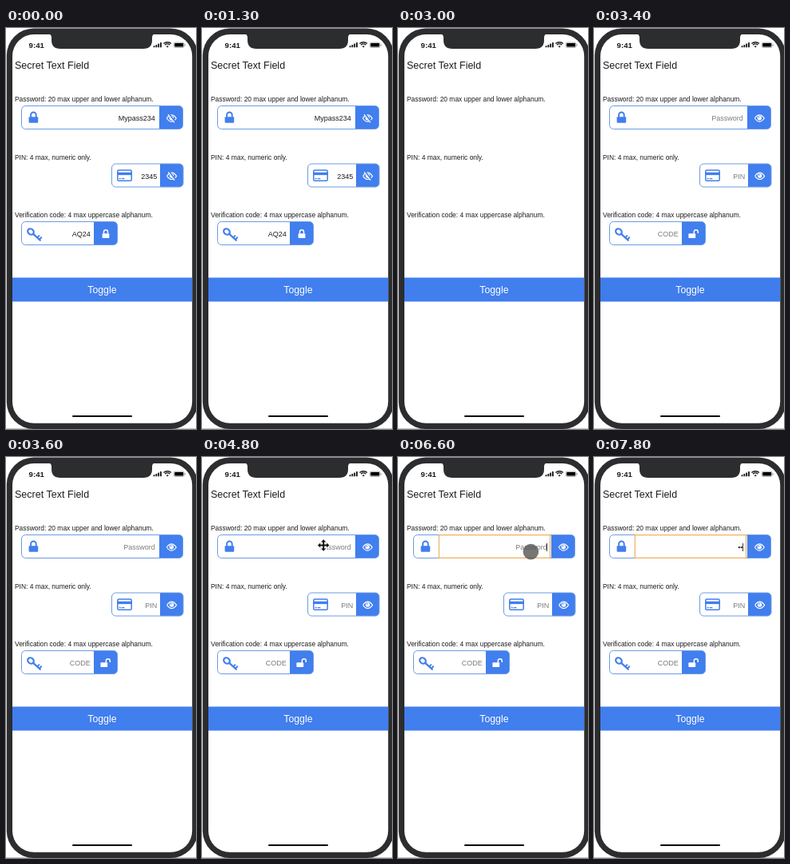
An HTML page with a canvas for the animation above (8 s loop, 238x502 px).

```html
<!DOCTYPE html>
<html lang="en">
<head>
<meta charset="utf-8">
<title>Secret Text Field</title>
<style>
html, body { margin: 0; width: 100%; height: 100%; overflow: hidden; background: #fff; }
canvas { display: block; width: 238px; height: 502px; }
</style>
</head>
<body>
<canvas id="stage"></canvas>
<script>
const W = 238, H = 502, LOOP = 8000;
const BLUE = '#417eee', BLUE_DOWN = '#3c75df', EDGE = '#6c9be3';
const INK = '#1c1c1c', HINT = '#7d7d7d', BODY = '#2c2d2f';
const SANS = '"Liberation Sans", Arial, sans-serif';

const canvas = document.getElementById('stage');
const ctx = canvas.getContext('2d');
const ratio = window.devicePixelRatio || 1;
canvas.width = W * ratio;
canvas.height = H * ratio;
ctx.scale(ratio, ratio);

const clamp = v => Math.max(0, Math.min(1, v));
const ease = v => v * v * (3 - 2 * v);
const span = (t, a, b) => clamp((t - a) / (b - a));

function text(str, x, y, size, color = INK, align = 'left', weight = '') {
  ctx.font = `${weight} ${size}px ${SANS}`;
  ctx.fillStyle = color;
  ctx.textAlign = align;
  ctx.fillText(str, x, y);
}

function rect(x, y, w, h, r, color) {
  ctx.beginPath();
  ctx.roundRect(x, y, w, h, r);
  ctx.fillStyle = color;
  ctx.fill();
}

function frame(x, y, w, h, r, color, line = 1) {
  ctx.beginPath();
  ctx.roundRect(x, y, w, h, r);
  ctx.strokeStyle = color;
  ctx.lineWidth = line;
  ctx.stroke();
}

function disc(x, y, r, color) {
  ctx.beginPath();
  ctx.arc(x, y, r, 0, Math.PI * 2);
  ctx.fillStyle = color;
  ctx.fill();
}

function line(points, color, width) {
  ctx.beginPath();
  points.forEach(([x, y]) => ctx.lineTo(x, y));
  ctx.strokeStyle = color;
  ctx.lineWidth = width;
  ctx.stroke();
}

function padlock(x, y, s, color, open) {
  ctx.save();
  ctx.translate(x, y);
  ctx.scale(s, s);
  rect(-5.8, -.5, 11.6, 7.5, 1, color);
  ctx.translate(open ? 6.6 : 0, 0);
  ctx.beginPath();
  ctx.moveTo(-3.3, 0);
  ctx.lineTo(-3.3, -3);
  ctx.arc(0, -3, 3.3, Math.PI, 0);
  ctx.lineTo(3.3, open ? -.8 : 0);
  ctx.strokeStyle = color;
  ctx.lineWidth = 1.9;
  ctx.stroke();
  ctx.restore();
}

function eye(x, y, struck) {
  ctx.beginPath();
  ctx.moveTo(x - 6, y);
  ctx.quadraticCurveTo(x, y - 8.4, x + 6, y);
  ctx.quadraticCurveTo(x, y + 8.4, x - 6, y);
  ctx.strokeStyle = '#fff';
  ctx.lineWidth = 1.2;
  ctx.stroke();
  disc(x, y - .3, 2.7, '#fff');
  disc(x - .8, y - 1.2, .8, BLUE);
  if (struck) {
    line([[x - 3.4, y - 5.4], [x + 4.6, y + 5]], BLUE, 2.4);
    line([[x - 4.4, y - 5], [x + 3.6, y + 5.4]], '#fff', 1.2);
  }
}

function card(x, y) {
  frame(x + .8, y + .8, 17.4, 13.2, 1.4, BLUE, 1.5);
  rect(x, y + 3.4, 19, 3.4, 0, BLUE);
  rect(x + 2.6, y + 10.6, 2.2, 1.3, 0, BLUE);
  rect(x + 5.8, y + 10.6, 3.6, 1.3, 0, BLUE);
}

function key(x, y) {
  ctx.save();
  ctx.translate(x, y);
  ctx.rotate(.74);
  ctx.beginPath();
  ctx.ellipse(0, 0, 4, 3.4, 0, 0, Math.PI * 2);
  ctx.strokeStyle = BLUE;
  ctx.lineWidth = 2.3;
  ctx.stroke();
  rect(4, -1.1, 13, 2.2, 1, BLUE);
  rect(10.2, -4, 1.9, 4, .4, BLUE);
  rect(13.6, -4.4, 2, 4.4, .4, BLUE);
  ctx.restore();
}

function field(x, y, w, split) {
  rect(x, y, w, 29, 5, '#fff');
  rect(split, y, x + w - split, 29, [0, 5, 5, 0], BLUE);
  frame(x, y, w, 29, 5, EDGE);
}

function fields(t) {
  const filled = t < 2600;
  const focus = t >= 6300;
  const dots = (t >= 7200) + (t >= 7500);
  const value = (a, b, x, y) => text(filled ? a : b, x, y, 9, filled ? INK : HINT, 'right');

  field(19.5, 97.5, 202, 192);
  padlock(34.4, 111.8, 1, BLUE, false);
  if (!dots) value('Mypass234', 'Password', 186.8, 116.3);
  eye(207.3, 113, filled);
  if (focus) {
    frame(51.3, 97.6, 139.2, 28.8, 0, '#efb05f', 1.2);
    rect(186, 108, .9, 10, 0, '#222');
  }
  for (let i = 0; i < dots; i++) disc(184.7 - i * 2.9, 113.2, 1.15, INK);

  field(132.5, 170, 89.5, 193);
  card(139, 177.3);
  value('2345', 'PIN', 189.3, 189);
  eye(207.6, 185.3, filled);

  field(19.5, 242.5, 120, 110);
  key(31, 255);
  value('AQ24', 'CODE', 105.8, 261.3);
  padlock(filled ? 125 : 122.8, 257.6, .76, '#fff', !filled);
}

function statusBar() {
  text('9:41', 28.6, 24.6, 9.6, INK, 'left', 'bold');
  for (let i = 0; i < 4; i++) {
    const h = 2 + i * 1.4;
    rect(184.6 + i * 2.8, 24.3 - h, 1.9, h, .4, INK);
  }
  for (const r of [2.3, 4.6, 6.9]) {
    ctx.beginPath();
    ctx.arc(202.2, 24.6, r, -Math.PI * .74, -Math.PI * .26);
    if (r < 3) {
      ctx.lineTo(202.2, 24.6);
      ctx.fillStyle = INK;
      ctx.fill();
    } else {
      ctx.strokeStyle = INK;
      ctx.lineWidth = 1.4;
      ctx.stroke();
    }
  }
  frame(210.3, 18.2, 12.8, 6.2, 1.6, '#8c8c8c', .7);
  rect(211.2, 19.1, 11, 4.4, .8, '#000');
  rect(223.8, 20.2, .9, 2.2, .4, '#8c8c8c');
}

function phone() {
  rect(0, 501, W, 1, 0, '#c4c4c4');
  rect(.8, .5, 239.4, 501.5, 34, BODY);
  rect(8, 8, 225.2, 486.8, 27, '#fff');
  ctx.beginPath();
  ctx.moveTo(53, 7);
  ctx.quadraticCurveTo(57, 8, 57, 12);
  ctx.lineTo(57, 15);
  ctx.quadraticCurveTo(57, 26, 68, 26);
  ctx.lineTo(172, 26);
  ctx.quadraticCurveTo(183, 26, 183, 15);
  ctx.lineTo(183, 12);
  ctx.quadraticCurveTo(183, 8, 187, 7);
  ctx.fillStyle = BODY;
  ctx.fill();
  rect(83, 485, 75, 2.1, 1, '#000');
}

function button(t) {
  const press = (a, b, c) => span(t, a, b) * (1 - span(t, b, c));
  const down = Math.max(press(2000, 2300, 2600), press(3050, 3200, 3450));
  rect(8, 312.6, 225.2, 29.8, 0, BLUE);
  ctx.globalAlpha = down;
  rect(8, 312.6, 225.2, 29.8, 0, BLUE_DOWN);
  ctx.globalAlpha = 1;
  text('Toggle', 120.4, 331.6, 12.3, '#fff', 'center');
}

function moveCursor(x, y) {
  ctx.save();
  ctx.translate(x, y);
  ctx.beginPath();
  for (let i = 0; i < 4; i++) {
    const c = Math.cos(i * Math.PI / 2), s = Math.sin(i * Math.PI / 2);
    for (const [u, v] of [[1, -1], [4, -1], [4, -3.1], [7.2, 0], [4, 3.1], [4, 1], [1, 1]]) {
      ctx.lineTo(u * c - v * s, u * s + v * c);
    }
  }
  ctx.closePath();
  ctx.lineJoin = 'round';
  ctx.strokeStyle = '#fff';
  ctx.lineWidth = 2;
  ctx.stroke();
  ctx.fillStyle = '#111';
  ctx.fill();
  ctx.restore();
}

function pointer(t) {
  if (t >= 4500 && t < 6100) {
    const a = ease(span(t, 4500, 4800));
    const b = ease(span(t, 4900, 5300));
    const c = ease(span(t, 5600, 6000));
    moveCursor(24 + 128.2 * a + 3.5 * b + 10 * c, 28 + 82.5 * a + 1.5 * b + 6 * c);
  } else if (t >= 6100 && t < 7000) {
    ctx.globalAlpha = 1 - span(t, 6800, 7000);
    disc(166.4, 118.6, 9.8, 'rgba(80,80,80,.78)');
    ctx.globalAlpha = 1;
  }
}

function draw(t) {
  ctx.fillStyle = '#fff';
  ctx.fillRect(0, 0, W, H);
  phone();
  statusBar();
  text('Secret Text Field', 11, 51.3, 12.5);
  text('Password: 20 max upper and lower alphanum.', 11, 92.2, 8.43);
  text('PIN: 4 max, numeric only.', 11, 164.8, 8.43);
  text('Verification code: 4 max uppercase alphanum.', 11, 237.2, 8.43);
  if (t < 2600 || t >= 3300) fields(t);
  button(t);
  pointer(t);
}

const start = performance.now();
function tick() {
  draw((performance.now() - start) % LOOP);
  requestAnimationFrame(tick);
}
tick();
</script>
</body>
</html>
```
